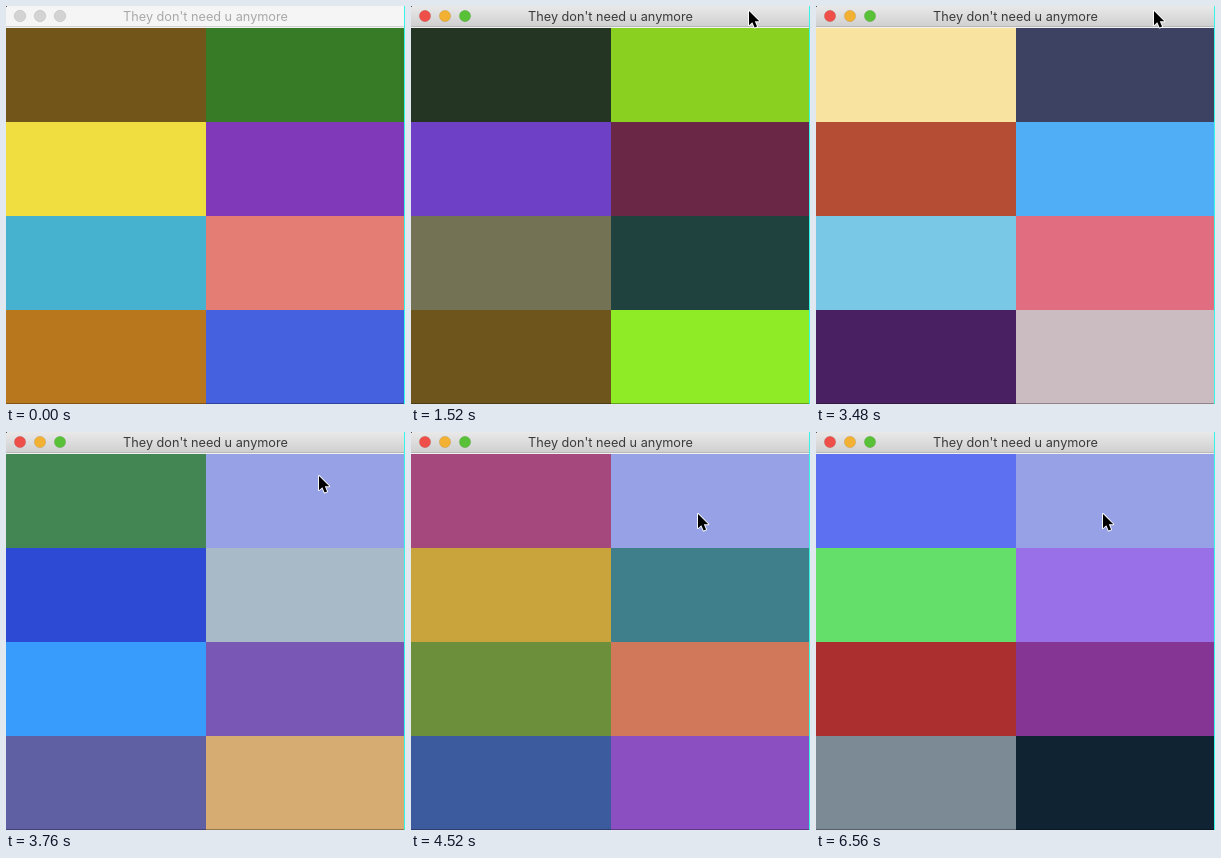
Write an HTML page with a canvas that moves like this. It is 399 px wide and 398 px high and loops after 6840 ms.

```html
<!DOCTYPE html>
<html lang="en">
<head>
<meta charset="utf-8">
<title>Colour tiles</title>
<style>
html, body { margin: 0; width: 100%; height: 100%; overflow: hidden; }
canvas { display: block; }
</style>
</head>
<body>
<canvas id="stage" width="399" height="398"></canvas>
<script>
const ctx = document.getElementById('stage').getContext('2d');
const LOOP = 6840, STEP = 40, ACTIVE_AT = 1320;

// Start time, then the tile colours row by row, left to right.
const palettes = [
  [0, '#725519 #377b27 #f0dd3f #8039b9 #46b2d0 #e47d73 #b8771d #4561df'],
  [520, '#7c5bb5 #4a4858 #5a512e #d2a56b #a2c02a #5054e4 #4e54fa #8bb238'],
  [1520, '#243623 #8ad021 #6e40c5 #6a2746 #747254 #1f423f #6e551b #8eeb25'],
  [2560, '#f8e3a1 #3d4263 #b54c34 #4faef5 #79c8e5 #e16e80 #492163 #cbbcc1'],
  [3520, '#438653 #96a2e5 #2d4ad4 #a8b9c8 #389cfc #7957b4 #5f60a3 #d6ac72'],
  [4520, '#a4487e #96a2e5 #c9a33c #3f7f8c #6b8f3a #d2785a #3c5a9e #8c4fc2'],
  [5560, '#d75328 #96a2e5 #224c5d #408b17 #003eb5 #73e5c0 #e56755 #4dab50'],
  [6560, '#5d70f1 #96a2e5 #64df69 #9a70e8 #aa2f2e #853593 #7c8a95 #0f2333']
].map(([start, list]) => ({ start, colors: list.split(' ') }));

const lights = ['#ee4f49', '#f3b133', '#58c137'];
const arrow = new Path2D('M0 0V14.2L3.3 11.2 5.6 16.6 8.1 15.5 5.8 10.3H10.3Z');

function rect(color, x, y, w, h) {
  ctx.fillStyle = color;
  ctx.fillRect(x, y, w, h);
}

function glide(t, start, end, from, to) {
  const p = Math.min(1, Math.max(0, (t - start) / (end - start)));
  const e = p * p * (3 - 2 * p);
  return from.map((v, i) => v + (to[i] - v) * e);
}

function drawTitleBar(active) {
  let fill = '#f5f5f5';
  if (active) {
    fill = ctx.createLinearGradient(0, 0, 0, 20);
    fill.addColorStop(0, '#e9e9e9');
    fill.addColorStop(1, '#d0d0d0');
  }
  rect(fill, 0, 0, 399, 20);
  rect(active ? '#b8b8b8' : '#d2d2d2', 0, 20, 399, 1);
  rect('#f1f1f1', 0, 21, 399, 1);
  rect('#555', 0, 0, 1, 1);

  lights.forEach((color, i) => {
    ctx.beginPath();
    ctx.arc(14 + 20 * i, 10, 5.7, 0, Math.PI * 2);
    ctx.fillStyle = active ? color : '#d3d3d3';
    ctx.fill();
    ctx.strokeStyle = active ? 'rgba(0,0,0,.12)' : '#c4c4c4';
    ctx.lineWidth = 0.7;
    ctx.stroke();
  });

  ctx.font = '12.7px Inter, "Open Sans", sans-serif';
  ctx.textAlign = 'center';
  ctx.fillStyle = active ? '#3b3b3b' : '#a9a9a9';
  ctx.fillText("They don't need u anymore", 199.5, 15);
}

function drawCursor(t) {
  if (t < 80) return;
  const [x, y] = t < 3520
    ? glide(t, 40, 680, [402, 130], [338, 5])
    : glide(t, 3520, 4000, [338, 5], [287, 82]);
  ctx.save();
  ctx.translate(Math.round(x), Math.round(y));
  ctx.lineJoin = 'round';
  ctx.lineWidth = 1.8;
  ctx.strokeStyle = '#fff';
  ctx.stroke(arrow);
  ctx.fillStyle = '#000';
  ctx.fill(arrow);
  ctx.restore();
}

function draw(now) {
  const t = Math.floor(now % LOOP / STEP) * STEP;
  const { colors } = palettes.filter(p => p.start <= t).pop();
  drawTitleBar(t >= ACTIVE_AT);
  colors.forEach((color, i) =>
    rect(color, i % 2 * 200, 22 + 94 * (i >> 1), 200, 94));
  rect('rgba(0,0,0,.3)', 0, 397, 399, 1);
  rect('#35f5e4', 398, 0, 1, 398);
  drawCursor(t);
}

const begin = performance.now();
function tick() {
  draw(performance.now() - begin);
  requestAnimationFrame(tick);
}
tick();
</script>
</body>
</html>
```
